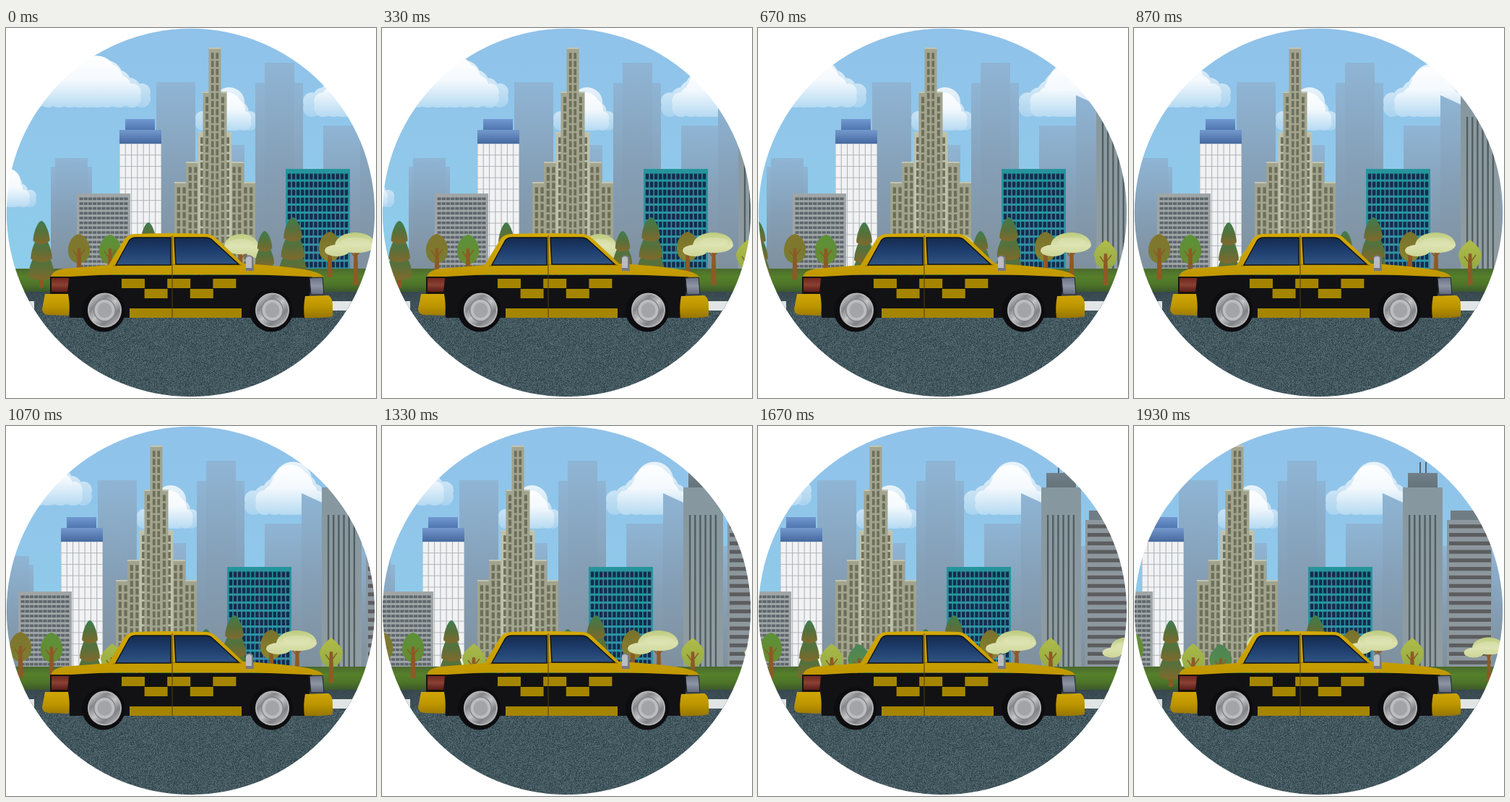
An HTML page with a canvas for the animation above (2.07 s loop, 512 by 512 pixels).

```html
<!DOCTYPE html>
<html lang="en">
<head>
<meta charset="utf-8">
<title>City taxi</title>
<style>
html, body { margin: 0; width: 100%; height: 100%; overflow: hidden; background: #fff; }
canvas { display: block; width: 512px; height: 512px; }
</style>
</head>
<body>
<canvas id="stage" width="512" height="512"></canvas>
<script>
const LOOP = 2070, STEP = 1000 / 15, LAST = 29, SPEED = 5.04, GROUND = 333;
const stage = document.getElementById('stage').getContext('2d');
let g, seed = 7;

const random = () => (seed = seed * 16807 % 2147483647) / 2147483647;

function layer(w, h, draw) {
  const c = document.createElement('canvas');
  c.width = w;
  c.height = h;
  g = c.getContext('2d');
  draw();
  return c;
}
function fade(y0, y1, ...colors) {
  const f = g.createLinearGradient(0, y0, 0, y1);
  colors.forEach((c, i) => f.addColorStop(i / (colors.length - 1), c));
  return f;
}
function box(x0, y0, x1, y1, fill) {
  g.fillStyle = fill;
  g.fillRect(x0, y0, x1 - x0, y1 - y0);
}
function oval(x, y, rx, ry, fill) {
  g.fillStyle = fill;
  g.beginPath();
  g.ellipse(x, y, rx, ry, 0, 0, 7);
  g.fill();
}
function shape(d, fill, line, width = 1) {
  const p = new Path2D(d);
  if (fill) { g.fillStyle = fill; g.fill(p); }
  if (line) { g.strokeStyle = line; g.lineWidth = width; g.stroke(p); }
}
// Evenly spread panes, each filling part of its cell
function panes(x0, y0, x1, y1, cols, rows, fx, fy, fill) {
  const w = (x1 - x0) / cols, h = (y1 - y0) / rows;
  for (let r = 0; r < rows; r++)
    for (let c = 0; c < cols; c++) {
      const x = x0 + w * (c + (1 - fx) / 2), y = y0 + h * (r + (1 - fy) / 2);
      box(x, y, x + w * fx, y + h * fy, fill);
    }
}

// Row of puffs that swells towards the peak, a pale one behind a white one
function cloud(x0, x1, top, base, peak) {
  const px = x0 + (x1 - x0) * peak;
  const row = (spread, fill) => {
    const a = px + (x0 - px) * spread, b = px + (x1 - px) * spread;
    const n = Math.round((b - a) / 17);
    g.fillStyle = fill;
    g.beginPath();
    for (let i = 0; i <= n; i++) {
      const u = i / n, near = 1 - Math.abs(u - peak) / (u < peak ? peak : 1 - peak);
      const h = (base - top) * (.45 + .55 * near ** 1.3), r = h * .36;
      const x = a + r + (b - a - 2 * r) * u;
      g.moveTo(x + r, base - h + r);
      g.arc(x, base - h + r, r, 0, 7);
      g.moveTo(x + r, base - r);
      g.arc(x, base - r, r, 0, 7);
    }
    g.fill();
  };
  row(1, fade(top, base, '#e9f4fc', '#cfe6f6', '#a9d3ef'));
  row(.78, fade(top, base, '#fff', '#f4f9fd', '#b5daf2'));
}
function haze(x0, y0, x1, slope = 0) {
  shape(`M${x0} ${y0}L${x1} ${y0 + slope}V${GROUND}H${x0}Z`,
    fade(y0, GROUND, '#8fb5d5', '#859fb6', '#7f909d'));
}

function trunk(x, y0, y1) {
  shape(`M${x - 1.5} ${y0}L${x - 3} ${y1}H${x + 3}L${x + 1.5} ${y0}Z
    M${x} ${y0 + 14}l-8 -11M${x} ${y0 + 12}l8 -11`, '#8d5a25', '#8d5a25', 1.4);
}
function conifer(x, top, h, w) {
  box(x - 3, top + h * .8, x + 3, top + h, '#8a5724');
  for (let k = 2; k >= 0; k--) {
    const a = top + h * .22 * k, b = top + h * (.3 + .27 * k), r = w * (.32 + .09 * k);
    shape(`M${x - r} ${b}C${x - r} ${b - r * .9} ${x - r * .45} ${a} ${x} ${a}
      C${x + r * .45} ${a} ${x + r} ${b - r * .9} ${x + r} ${b}Q${x} ${b + 9} ${x - r} ${b}Z`,
      fade(a, b + 4, '#3f7d50', '#57703a', '#80692c'));
  }
}
// Rounded crown; a sharp one tapers to the top
function crown(x, top, dark, light, sharp = 0) {
  const s = 10 - 8 * sharp, w = 16 + 4 * sharp;
  shape(`M${x} ${top}C${x + s} ${top + 2} ${x + w} ${top + 14} ${x + 15} ${top + 25}
    C${x + 13} ${top + 46} ${x - 13} ${top + 46} ${x - 15} ${top + 25}
    C${x - w} ${top + 14} ${x - s} ${top + 2} ${x} ${top}Z`, fade(top, top + 42, dark, light));
  trunk(x, top + 20, top + 62);
}
function parasol(x, y, sx, sy) {
  g.save();
  g.translate(x, y);
  g.scale(sx, sy);
  trunk(0, 6, 56);
  const cream = fade(-16, 20, '#bccb7d', '#dde2b0', '#c9d392');
  oval(-26, 9, 17, 8, cream);
  shape('M-29 2C-27 -22 26 -22 27 2C22 17 -24 14 -29 2Z', cream);
  oval(0, -3, 20, 6, '#e3e7bd66');
  g.restore();
}

const city = layer(680, 366, () => {
  box(0, 0, 680, 366, fade(0, GROUND, '#90c2ea', '#90c7ea', '#8dcdea'));
  cloud(0, 200, 36, 110, .7);
  cloud(262, 347, 82, 142, .6);
  cloud(411, 535, 48, 123, .56);
  cloud(-40, 42, 194, 248, .5);

  haze(62, 192, 119);
  haze(68, 180, 113);
  haze(208, 75, 262);
  haze(308, 162, 330);
  haze(345, 76, 411);
  haze(358, 48, 399);
  haze(439, 135, 492);
  haze(490, 93, 540, 23);
  haze(570, 166, 660);

  // White office block
  box(157, 158, 215, GROUND, '#adb3ba');
  panes(157, 160, 215, GROUND, 7, 11, .87, .94, '#f1f2f3');
  box(165, 126, 206, 142, fade(126, 142, '#7199d0', '#4d74ad'));
  box(157, 141, 215, 160, fade(141, 160, '#7499cd', '#45699f'));

  // Grey block
  box(98, 229, 172, GROUND, '#a0a5a6');
  panes(101, 233, 169, GROUND, 11, 15, .84, .55, '#5d666b');

  // Stepped tower, widest tier first
  for (const [half, top] of [[56, 213], [40, 185], [23.5, 144], [16.5, 88], [8.5, 27]]) {
    const x0 = 289 - half, x1 = 289 + half, main = half === 23.5;
    box(x0, top, x1, GROUND, main ? '#bec1ac' : '#a1a48e');
    box(x0, top, x1, top + 2, '#c3c5b1');
    panes(x0 + 2, top + 6, x1 - 2, GROUND, Math.round(half / 4), Math.round((GROUND - top) / 11.5),
      .56, .76, '#6d6f59');
  }

  // Teal block
  box(387, 195, 476, GROUND, fade(195, GROUND, '#25949b', '#3393a8'));
  panes(389, 200, 474, GROUND, 14, 12, .74, .72, '#172b4d');

  // Striped towers
  for (const x of [541, 549]) box(x, 50, x + 2, 66, '#566469');
  box(525, 65, 566, 86, fade(65, 86, '#718089', '#647279'));
  box(518, 85, 573, GROUND, fade(85, GROUND, '#86979f', '#909da2'));
  panes(523.5, 123, 566.5, GROUND, 6, 1, .33, 1, '#525d60');
  box(584, 117, 635, 132, '#717d85');
  box(579, 130, 641, GROUND, '#8d989e');
  panes(582, 133, 640, GROUND, 1, 17, 1, .45, '#5c5d5f');

  box(0, GROUND, 680, 366, fade(GROUND, 366, '#4b6a2e', '#55802a', '#4d7429', '#3a562a'));

  conifer(49, 267, 92, 36);
  crown(101, 285, '#82752d', '#767d31');
  crown(144, 286, '#5b9138', '#688a31');
  conifer(197, 269, 92, 34);
  crown(228, 301, '#a9b947', '#93aa45', 1);
  crown(266, 302, '#4b8556', '#5d8c45', .5);
  parasol(325, 301, -.85, 1);
  conifer(358, 281, 80, 32);
  conifer(397, 262, 96, 40);
  crown(448, 282, '#77712c', '#8a842f');
  parasol(484, 299, 1, 1);
  crown(531, 293, '#b0bd48', '#93aa45', 1);
  parasol(637, 306, .8, .85);
});

const road = layer(512, 147, () => {
  const img = g.createImageData(512, 147);
  for (let i = 0; i < img.data.length; i += 4) {
    const n = (random() - .5) * 46;
    img.data.set([67 + n, 87 + n, 95 + n, 255], i);
  }
  g.putImageData(img, 0, 0);
});

function wheel(x, y) {
  oval(x, y, 30, 29.5, '#0d0d0f');
  const rim = g.createLinearGradient(x - 16, y - 20, x + 18, y + 20);
  ['#c9c9cb', '#85868a', '#c4c4c6', '#808186', '#b4b4b7'].forEach((c, i) => rim.addColorStop(i / 4, c));
  oval(x + 1.5, y - .5, 23.5, 24, '#b4b4b6');
  oval(x + 1.5, y - .5, 21.5, 22, rim);
  oval(x + 1.5, y - .5, 15.5, 16, '#85868a');
  oval(x + 1.5, y - .5, 14, 14.5, '#bdbdc0');
  oval(x + 1.5, y - .5, 10, 10.5, '#a3a4a8');
}

const car = layer(512, 512, () => {
  const gold = '#a58500';
  shape('M64 342H424L420 370 414 401H88L86 368Z', '#121214');
  shape(`M62 344Q65 335 80 333L142 328 164 292Q168 286 178 285Q230 283 278 285Q286 286 292 292L328 326
    Q385 329 417 335Q437 339 439 345L340 341H146L90 344Z`, fade(284, 345, '#d2a905', '#c19800'));
  shape('M148 329Q232 326 326 328', null, '#8a6c00');

  const glass = fade(290, 328, '#142b4e', '#1f3f6f', '#305582');
  shape('M152 328L170 295Q173 290 180 290H228V328Z', glass, '#101318', 1.5);
  shape('M233 290H276Q282 290 286 294L322 327H235Z', glass, '#101318', 1.5);

  // Checkers and sills
  for (let i = 0; i < 5; i++) {
    const x = 160 + 31.6 * i, y = i % 2 ? 361 : 347;
    box(x, y, x + 32, y + 13, gold);
  }
  box(171, 388, 326, 401, gold);
  shape('M230 287V401', null, '#4d3f08');

  // Lights
  shape('M61 344H89L87 368H61Z', '#1b1212');
  shape('M63 346H87L85 365H63Z', fade(346, 365, '#71281f', '#8a4034', '#5a1d18'));
  shape('M420 346L438 345 440 369H422Z', fade(345, 369, '#687086', '#8d95a5', '#5e6678'), '#22252c');

  // Bumpers
  const bumper = fade(368, 402, '#d0a606', '#bd9500', '#957300');
  shape('M54 368H86Q89 384 87 398L58 397Q50 396 50 389Z', bumper);
  shape('M414 371L446 370Q452 373 452 384V399Q440 402 413 401Q411 386 414 371Z', bumper);

  // Mirror
  shape('M332 316Q337 312 342 317L343 336H332Z', '#75797f');
  shape('M332 318Q337 314 340 318V332H332Z', '#b9bdc2');

  wheel(135, 391);
  wheel(367, 391);
});

function render(now) {
  const i = Math.min(LAST, Math.floor((now % LOOP + 4) / STEP));
  g = stage;
  box(0, 0, 512, 512, '#fff');
  g.save();
  g.beginPath();
  g.arc(255.5, 255.5, 254.7, 0, 7);
  g.clip();
  g.drawImage(city, -Math.round(i * SPEED), 0);
  const slide = -(i * 97 % 512);
  g.drawImage(road, slide, 365);
  g.drawImage(road, slide + 512, 365);
  box(0, 365, 512, 392, fade(365, 392, '#35444bcc', '#3c4d5577'));
  box(0, 378, 39, 391, '#e1e5e6');
  box(450, 378, 512, 391, '#e1e5e6');
  g.drawImage(car, 0, 0);
  g.restore();
}
let start;
function tick(now) {
  start ??= now;
  render(now - start);
  requestAnimationFrame(tick);
}
render(0);
requestAnimationFrame(tick);
</script>
</body>
</html>
```
